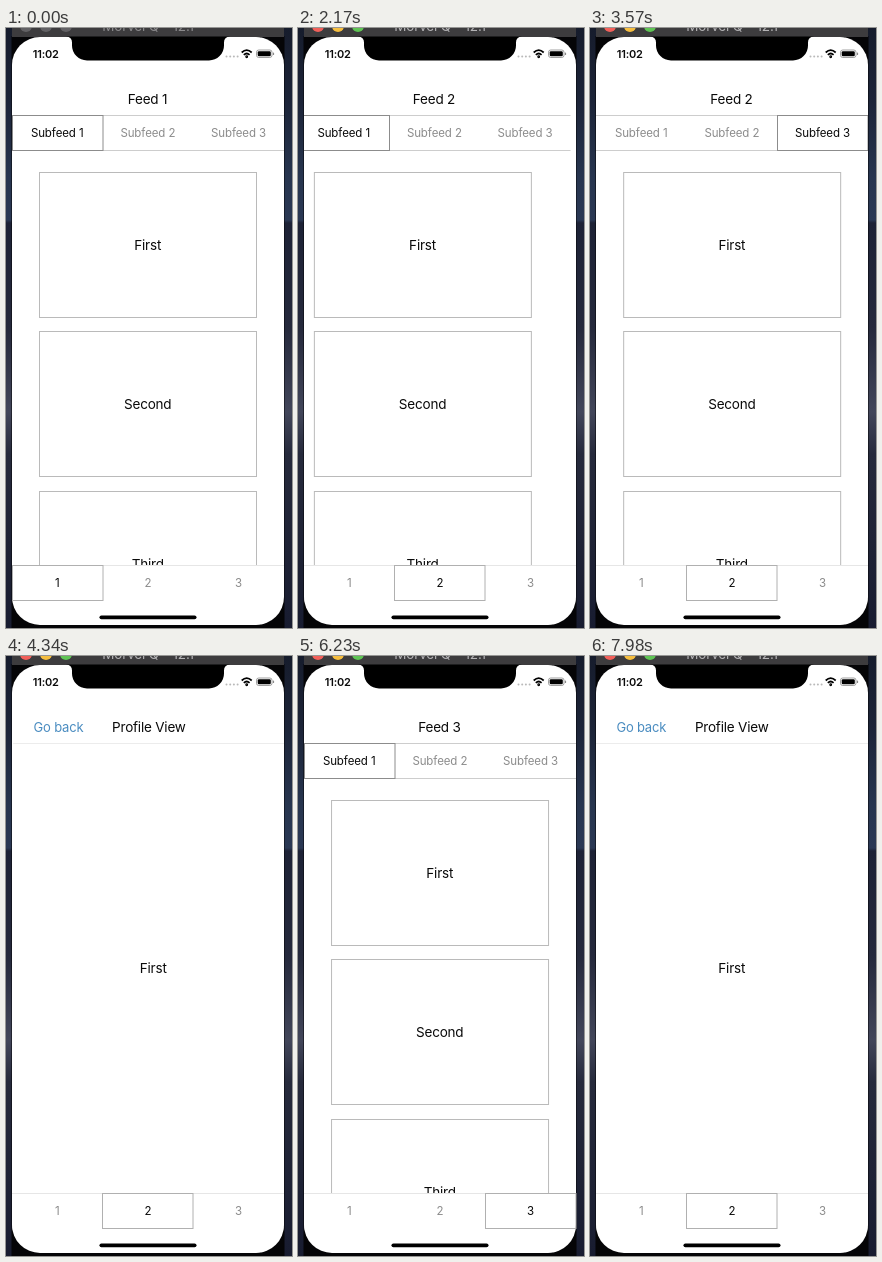
Animation of 286 by 600 pixels, one loop 8 s. Source, as an HTML page:

```html
<!DOCTYPE html>
<html lang="en">
<head>
<meta charset="utf-8">
<title>Nested tabs</title>
<style>
html, body { margin: 0; width: 100%; height: 100%; overflow: hidden; background: #171c2e; }
svg { display: block; width: 286px; height: 600px; }
text { font: 13.5px Inter, "Liberation Sans", sans-serif; letter-spacing: -.2px; text-anchor: middle; fill: #0a0a0a; }
.small { font-size: 11.5px; letter-spacing: -.1px; }
.off { fill: #8c8c8c; }
.line { fill: none; stroke: #cdcdcd; }
.box { fill: none; stroke: #bababa; }
</style>
</head>
<body>
<svg viewBox="0 0 286 600">
  <defs>
    <linearGradient id="sky" x1="0" y1="0" x2="0" y2="1">
      <stop offset="0" stop-color="#161c2c"/>
      <stop offset=".12" stop-color="#1c2438"/>
      <stop offset=".25" stop-color="#27354f"/>
      <stop offset=".32" stop-color="#2a3854"/>
      <stop offset=".325" stop-color="#1d2236"/>
      <stop offset=".5" stop-color="#25293c"/>
      <stop offset=".64" stop-color="#42465a"/>
      <stop offset=".71" stop-color="#262a3c"/>
      <stop offset="1" stop-color="#181c30"/>
    </linearGradient>
    <clipPath id="page"><rect x="6" y="40" width="272" height="497"/></clipPath>
  </defs>
  <rect width="286" height="600" fill="url(#sky)"/>
  <rect x="5.500" y="8" width="273" height="592" fill="#050507"/>
  <rect x="6" width="272" height="9" fill="#3d3c3e"/>
  <g id="lights">
    <circle cx="20" cy="-2" r="6"/><circle cx="40" cy="-2" r="6"/><circle cx="60" cy="-2" r="6"/>
  </g>
  <text id="caption" x="142" y="3.2">Morvel Q – 12.1</text>
  <rect x="6" y="9" width="272" height="588" rx="28" fill="#fff"/>
  <path fill="#000" d="M60 8.500q6 .5 6 6v3a15 15 0 0 0 15 15h122a15 15 0 0 0 15-15v-3q0-5.500 6-6z"/>
  <text x="39.700" y="29.500" style="font-size:11px;font-weight:600">11:02</text>
  <g fill="#b9b9b9">
    <circle cx="220.500" cy="28.500" r="1"/><circle cx="224.200" cy="28.500" r="1"/>
    <circle cx="227.900" cy="28.500" r="1"/><circle cx="231.600" cy="28.500" r="1"/>
  </g>
  <g fill="none" stroke="#000" stroke-width="1.700">
    <path d="M235.700 24.500q5-4.600 10 0M237.800 26.800q2.900-2.600 5.800 0"/>
    <circle cx="240.700" cy="28.800" r=".6"/>
  </g>
  <rect x="250.500" y="22" width="15.500" height="7.500" rx="2.200" fill="none" stroke="#8a8a8a" stroke-width=".8"/>
  <rect x="251.700" y="23.200" width="13.100" height="5.100" rx="1.200"/>
  <rect x="266.900" y="24.500" width="1.200" height="2.500" rx=".6" fill="#8a8a8a"/>
  <g id="pages" clip-path="url(#page)"></g>
  <g id="tabs"><path class="line" style="stroke:#e6e6e6" d="M6 537.500h272"/></g>
  <rect x="93.500" y="587.500" width="97" height="3.700" rx="1.850"/>
</svg>
<script>
const LOOP = 8000, STEP = 70, SPAN = 286;
const HEAD_RATE = .0245, BODY_RATE = .01885;
const $ = id => document.getElementById(id);

function add(parent, tag, attrs, text) {
  const el = document.createElementNS('http://www.w3.org/2000/svg', tag);
  for (const k in attrs) el.setAttribute(k, attrs[k]);
  if (text) el.textContent = text;
  parent.append(el);
  return el;
}
const group = parent => add(parent, 'g', {});
const label = (parent, x, y, text, cls = '') => add(parent, 'text', { x, y, class: cls }, text);
const tabX = i => 6 + 90.67 * i;

// A row of three tabs; returns a setter for the active tab and label opacities.
function tabRow(parent, top, height, baseline, prefix, stroke) {
  const box = add(parent, 'rect', {
    class: 'box', y: top, width: 90.5, height, style: 'stroke:' + stroke
  });
  const names = [0, 1, 2].map(i => label(parent, tabX(i) + 45.2, baseline, prefix + (i + 1), 'small'));
  return (active, alpha) => {
    box.setAttribute('x', Math.floor(tabX(active)) + .5);
    box.setAttribute('opacity', alpha[active]);
    names.forEach((n, i) => {
      n.setAttribute('class', i === active ? 'small' : 'small off');
      n.setAttribute('opacity', alpha[i]);
    });
  };
}

function feedHead(n) {
  const g = group($('pages'));
  label(g, 141.5, 76, 'Feed ' + n);
  add(g, 'path', { class: 'line', d: 'M6 87.500h272M6 122.500h272' });
  const set = tabRow(g, 87.5, 35, 109, 'Subfeed ', '#8c8c8c');
  set(0, [1, 1, 1]);
  return { g, set };
}

function feedBody() {
  const g = group($('pages'));
  const cards = ['First', 'Second', 'Third'].map((name, i) => {
    const card = group(g), y = 144.5 + Math.round(159.3 * i);
    add(card, 'rect', { class: 'box', x: 33.5, y, width: 217, height: 145 });
    label(card, 141.7, y + 77, name);
    return card;
  });
  return { g, cards };
}

function profile() {
  const body = group($('pages')), head = group($('pages'));
  label(body, 141.7, 317, 'First');
  add(head, 'path', { class: 'line', style: 'stroke:#ececec', d: 'M6 87.500h272' });
  const back = label(head, 51.3, 76, 'Go back');
  back.style.fill = '#4a8cc0';
  back.style.fontSize = '13px';
  label(head, 141.7, 76, 'Profile View');
  return { head, body };
}

const heads = [1, 2, 3].map(feedHead);
const bodies = [0, 1, 2, 3].map(feedBody);
const screen = (h, b) => ({ head: heads[h].g, body: bodies[b].g });
const one = screen(0, 0), two = screen(1, 1), twoLast = screen(1, 3), three = screen(2, 2);
const detail = profile();
const setTabs = tabRow($('tabs'), 537.5, 35, 558.5, '', '#b0b0b0');

// start, from, to, side the new screen enters from
const moves = [
  [1019, one, three, 1],
  [1930, three, two, -1],
  [3049, two, twoLast, 1],
  [4028, twoLast, detail, 1],
  [4945, detail, one, -1],
  [5640, one, three, 1],
  [6585, three, one, -1],
  [7390, one, detail, 1]
];
const tabTimes = [[0, 0], [1050, 2], [1960, 1], [4970, 0], [5670, 2], [6510, 0], [7420, 1]];

const rest = (t, rate) => (1 + rate * t) * Math.exp(-rate * t);
const lastBefore = (list, t) => list.filter(row => row[0] <= t).pop();

// Opacity of something held down from a to b, then released.
function press(t, a, b) {
  if (t < a) return 1;
  return t <= b ? .24 : Math.min(1, .24 + (t - b) / 220);
}

function place(el, x) {
  el.setAttribute('visibility', 'visible');
  el.setAttribute('transform', `translate(${x.toFixed(2)} 0)`);
}

function draw(t) {
  for (const el of $('pages').children) el.setAttribute('visibility', 'hidden');
  const move = lastBefore(moves, t);
  if (!move) {
    place(one.head, 0);
    place(one.body, 0);
  } else {
    const [start, from, to, side] = move;
    for (const [part, rate] of [['head', HEAD_RATE], ['body', BODY_RATE]]) {
      const r = rest(t - start, rate);
      if (from[part] === to[part]) { place(to[part], 0); continue; }
      place(from[part], (r - 1) * side * SPAN);
      place(to[part], r * side * SPAN);
    }
  }

  heads[1].set(t < 3080 ? 0 : 2, [1, 1, press(t, 2940, 3080)]);
  bodies[3].cards[0].setAttribute('opacity', press(t, 3850, 3920));
  const second = t < 5000 ? press(t, 1820, 1900) : press(t, 7210, 7350);
  setTabs(lastBefore(tabTimes, t)[1], [press(t, 4830, 4900), second, 1]);

  const live = Math.min(1, Math.max(0, (t - 490) / 140));
  ['#f2605a', '#f6be3f', '#5fc454'].forEach((c, i) => {
    $('lights').children[i].style.fill = `color-mix(in srgb, ${c} ${live * 100}%, #626164)`;
  });
  $('caption').style.fill = live > .5 ? '#b4b3b5' : '#8b8a8c';
}

const begin = performance.now();
function tick() {
  const t = (performance.now() - begin) % LOOP;
  draw(Math.floor(t / STEP) * STEP);
  requestAnimationFrame(tick);
}
draw(0);
requestAnimationFrame(tick);
</script>
</body>
</html>
```
